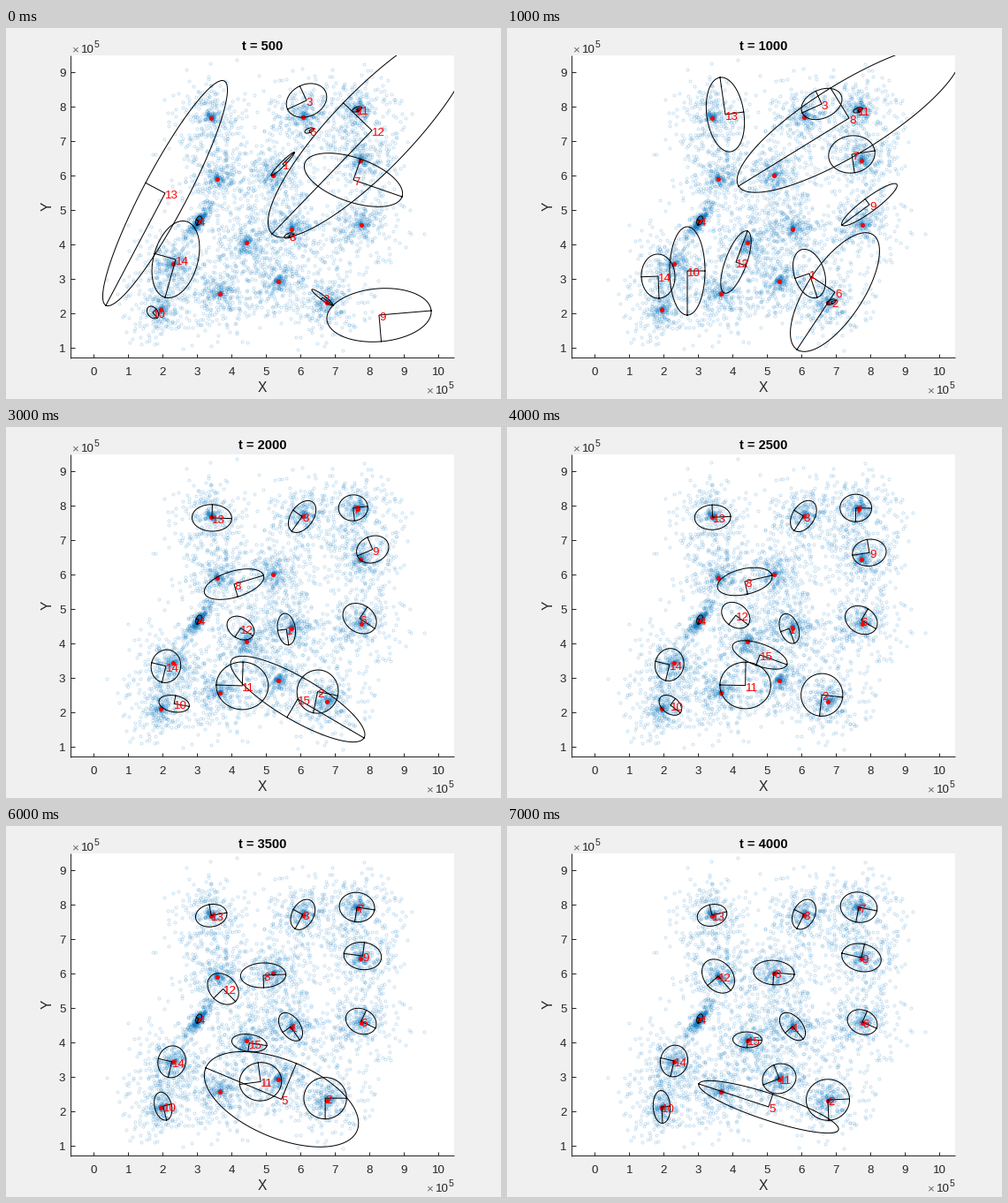
Write a matplotlib script that moves like this. It is 560 px wide and 420 px high and loops after 8000 ms.

```python
import numpy as np
import matplotlib.pyplot as plt
from matplotlib.animation import FuncAnimation
from matplotlib.patches import Rectangle

W, H, DPI = 560, 420, 100
LEFT, RIGHT, TOP, BOTTOM = 73, 507, 31, 373
UNIT = 39
PT = 72 / DPI
GREY = "#262626"
STEPS = 8

plt.rcParams["font.family"] = "Liberation Sans"
fig = plt.figure(figsize=(W / DPI, H / DPI), dpi=DPI, facecolor="#f0f0f0")
ax = fig.add_axes([0, 0, 1, 1])
ax.set_xlim(0, W)
ax.set_ylim(H, 0)
ax.axis("off")


def write(x, y, s, px=13.33, color=GREY, **kw):
    kw.setdefault("va", "baseline")
    return ax.text(x, y, s, fontsize=px * PT, color=color, **kw)


def line(xs, ys):
    ax.plot(xs, ys, color=GREY, lw=PT, solid_capstyle="butt", zorder=3)


def exponent(x, y):
    write(x, y + 0.5, "×", 13.33, "#666666")
    write(x + 11, y, "10")
    write(x + 25.5, y - 6.5, "5", 10.5)


# Plot area and axes
area = Rectangle((LEFT, TOP), RIGHT - LEFT, BOTTOM - TOP, fc="white", ec="none", zorder=0)
ax.add_patch(area)
line([LEFT, LEFT], [TOP, BOTTOM + 0.5])
line([LEFT, RIGHT], [BOTTOM, BOTTOM])
for k in range(11):
    x = 99.2 + UNIT * k
    line([x, x], [BOTTOM, BOTTOM - 4.5])
    write(x + 0.3, 393, str(k), ha="center")
for k in range(1, 10):
    y = 362 - UNIT * (k - 1)
    line([LEFT, LEFT + 4.5], [y, y])
    write(67.5, y + 5, str(k), ha="right")
exponent(74, 28)
exponent(475, 414)
write(290, 412, "X", 15.5, ha="center")
write(47.5, 202, "Y", 15.5, ha="center", va="center", rotation=90)
title = write(290, 24.6, "", 14.67, "black", ha="center", weight="bold")

# Each label ends up on one cluster of the point cloud
home = {
    13: (232, 101), 3: (336, 100), 7: (398, 92), 12: (239, 170), 8: (302, 166),
    9: (401, 149), 4: (218, 218), 1: (323, 227), 6: (402, 222), 15: (272, 242),
    14: (189, 266), 5: (242, 300), 11: (308, 286), 2: (363, 310), 10: (175, 318)}
NARROW = 4
rng = np.random.default_rng(4)


def blob(label, n=333):
    r = np.abs(rng.normal(size=n))
    a = rng.uniform(0, 2 * np.pi, n)
    p = np.c_[r * np.cos(a), r * np.sin(a)]
    if label == NARROW:
        p = p * (15, 4) @ np.array([(0.6, -0.8), (0.8, 0.6)])
    else:
        p = p * 27
    return p + home[label]


cloud = np.vstack([blob(label) for label in home])
dots, = ax.plot(*cloud.T, "o", ms=3.1 * PT, mfc="none", mec=(0, 0.447, 0.741, 0.27),
                mew=0.7 * PT, zorder=1)
dots.set_clip_path(area)
ax.plot(*(np.array(list(home.values())) + (0, 0.6)).T, "o", ms=5 * PT,
        color="red", mew=0, zorder=2)

# An ellipse is (centre x, centre y, first semi-axis dx, dy, signed second length).
# First two steps: wide searching ellipses, plus specks given by place only.
SPECK = (5, -2, 2.5)
search = [
    {13: (180, 187, -67, 127, 25), 14: (192, 262, -12, 43, 25),
     3: (340, 82, -21.5, 10, 18), 12: (414, 116, -113, 117, 45),
     7: (393, 172, 55, 19, -25), 9: (422, 325, 59, -5, 30),
     1: (313, 154, 13, -13, 2.5), 2: (358, 305, 12, 9, 2.5),
     10: (166, 322, 5, 6, -5.5)},
    {13: (247, 98, -6, -42, 21), 3: (356, 86, -22, 10, 16),
     8: (387, 102, -125, 77, 40), 7: (390, 143, 26, -4, 21),
     9: (410, 200, -31, 23, 8), 10: (204, 275, 0, 50, -20),
     14: (171, 281, 1, 25, 19), 12: (259, 265, 13, -35, 12),
     1: (342, 278, 9, 27, 17), 6: (371, 299, -43, 65, 31.6)}]
specks = [{11: (397, 92), 6: (343, 116), 8: (320, 235)},
          {11: (397, 93), 2: (367, 310)}]

# Later steps: label -> (first ellipse, semi-axis once settled)
tracks = {
    13: ((234, 105, 29, 6, -18.5), (16.5, -4)),
    3: ((334, 103, -16, 17, 13), (-8, 16)),
    7: ((387, 91, 12, -8, 12), (20.5, 4)),
    9: ((430, 127, -12, 21, 14), (-22, -5)),
    8: ((247, 181, 36, -13, 15), (23, 2)),
    6: ((398, 211, 18, 16, -18), (16, 7)),
    12: ((272, 242, 14, 7, 11), (14, 16)),
    1: ((311, 231, -8, 22, 9), (12, 14)),
    14: ((172, 276, -5, 19, 18), (-4, 17.5)),
    10: ((207, 308, 35, -14, -9), (1, 18.5)),
    11: ((267, 293, -29.5, -1, 27), (-18, 7)),
    2: ((341, 288, 21, 11, 26), (24.5, -1)),
    15: ((330, 308, 75, 44, 24), (16.5, 0.5))}
stray = (379, 272, -114, -77, 169), (296, 318, -79, -26, 15)
born = {15: 3, 5: 5}
pace = {8: 1, 12: 1, 11: 3, 15: 0.2, 5: 0.3}


def settled(label, first, axis):
    """Ellipse at home, rounder than at the start."""
    ratio = (abs(first[4]) / np.hypot(*first[2:4]) + 0.8) / 2
    return (*home[label], *axis, np.sign(first[4]) * ratio * np.hypot(*axis))


def glide(label, first, last, i):
    start = born.get(label, 2)
    p = ((i - start) / (STEPS - 1 - start)) ** pace.get(label, 0.4)
    return np.array(first) + p * (np.array(last) - first)


def ellipses(i):
    out = {4: (*home[4], -2, 5, 3)}
    if i < len(search):
        out.update(search[i])
        out.update({k: (*place, *SPECK) for k, place in specks[i].items()})
        return out
    ends = {k: (first, settled(k, first, axis)) for k, (first, axis) in tracks.items()}
    ends[5] = stray
    for k, (first, last) in ends.items():
        if i >= born.get(k, 2):
            out[k] = glide(k, first, last, i)
    return out


angle = np.linspace(0, 2 * np.pi, 121)
shown = []


def draw_ellipse(label, cx, cy, dx, dy, b):
    c = np.array([cx, cy])
    u = np.array([dx, dy])
    v = np.array([-dy, dx]) * b / np.hypot(dx, dy)
    ring = c + np.outer(np.cos(angle), u) + np.outer(np.sin(angle), v)
    path = np.vstack([ring, [(np.nan, np.nan)], [c + u, c, c + v]])
    curve, = ax.plot(*path.T, color="black", lw=PT, zorder=4)
    curve.set_clip_path(area)
    shown.extend([curve, write(cx, cy + 6, str(label), color="red", zorder=5)])


def update(i):
    while shown:
        shown.pop().remove()
    title.set_text(f"t = {500 * (i + 1)}")
    for label, shape in ellipses(i).items():
        draw_ellipse(label, *shape)
    return [title, *shown]


anim = FuncAnimation(fig, update, frames=STEPS, interval=1000, repeat=True, blit=False)
plt.show()
```
